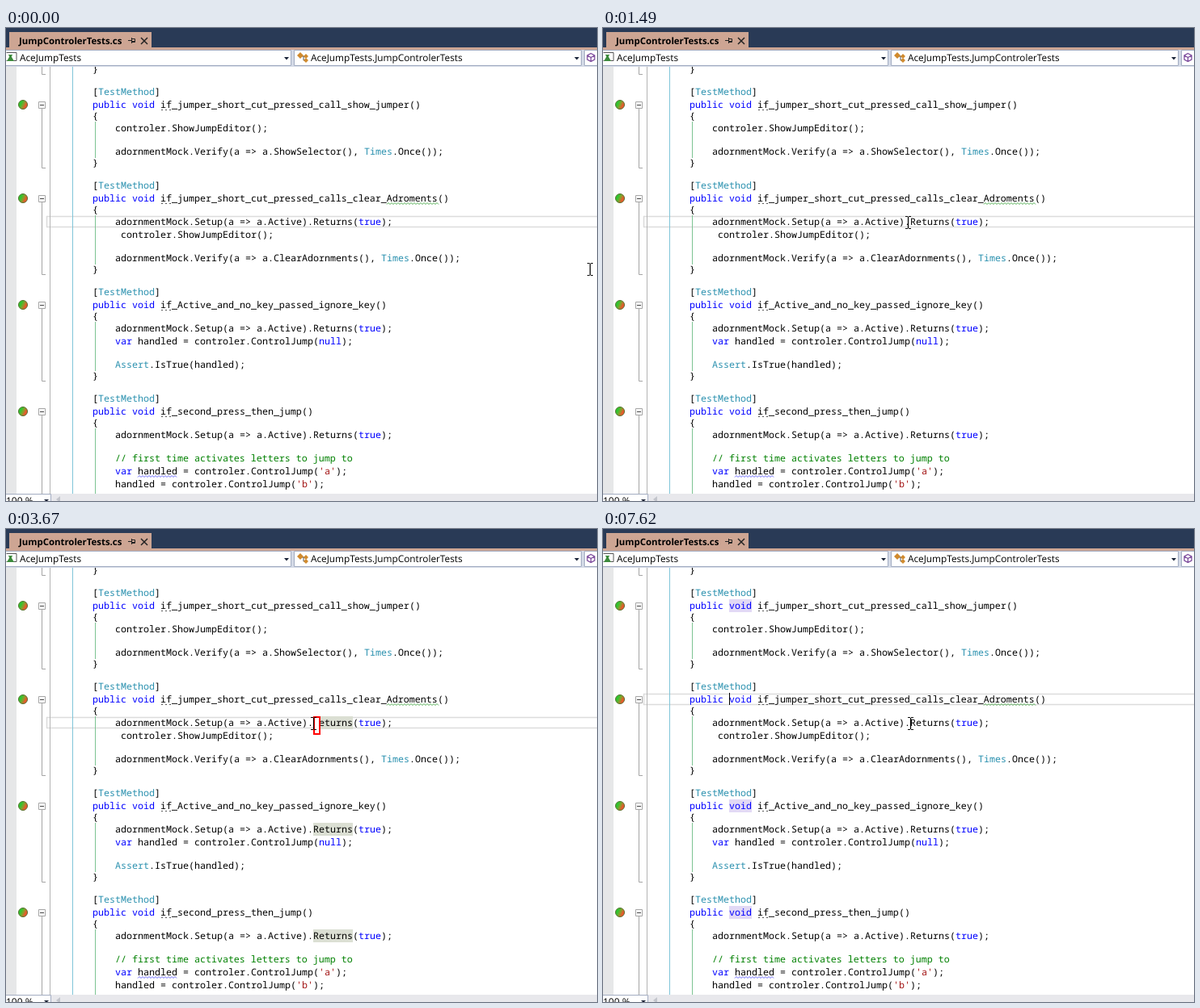
These frames come from a looping animation (731 by 586 pixels, 8000 ms). An HTML page:

```html
<!DOCTYPE html>
<html lang="en">
<head>
<meta charset="utf-8">
<title>Jump to letter in a code editor</title>
<style>
html, body { margin: 0; width: 100%; height: 100%; overflow: hidden; background: #fff; }
svg { display: block; width: 731px; height: 586px; }
text { white-space: pre; text-rendering: geometricPrecision; }
.code { font: 11.667px "Noto Sans Mono", "DejaVu Sans Mono", monospace; }
.ui { font: 12px "Open Sans", "Noto Sans", sans-serif; }
.bold { font-weight: 700; }
.kw { fill: #00f; } .type { fill: #2b91af; } .note { fill: #008000; } .str { fill: #a31515; }

.anim { animation: 8s step-end infinite; }
#mouse { animation-name: mouse; }
#row { animation-name: row; }
#tip { animation-name: tip; }
#refs { animation-name: refs; }
#own { animation-name: own; }
#voids { animation-name: voids; }
#caret { animation-name: caret; }
#caret2 { animation-name: caret2; }
#prompt { animation-name: prompt; }
#labels { animation-name: labels; }
@keyframes mouse {
  0% { transform: translate(722px, 299px); }
  6.625% { transform: translate(721px, 301px); }
  8.5% { transform: translate(509px, 247px); }
  11.625% { transform: translate(508px, 247px); }
  13.375% { transform: translate(364px, 247px); }
  15.25% { transform: translate(362px, 247px); }
  16.75% { transform: translate(374px, 242px); }
  18.625% { transform: translate(377px, 241px); }
  20.5%, 100% { transform: translate(380px, 241px); }
}
@keyframes row { 0% { transform: none; } 88.625%, 100% { transform: translateY(-29px); } }
@keyframes tip { 0% { opacity: 0; } 16.75% { opacity: 1; } 18.625%, 100% { opacity: 0; } }
@keyframes refs {
  0% { opacity: 0; fill: #e2d9f5; }
  23.5% { opacity: 1; fill: #e2d9f5; }
  35.5% { opacity: 1; fill: #dbdfd3; }
  88.625%, 100% { opacity: 0; fill: #dbdfd3; }
}
@keyframes own { 0% { opacity: 0; } 35.5% { opacity: 1; } 88.625%, 100% { opacity: 0; } }
@keyframes voids { 0% { opacity: 0; } 88.625%, 100% { opacity: 1; } }
@keyframes caret {
  0% { opacity: 0; } 22% { opacity: 1; } 28.875% { opacity: 0; }
  35.5% { opacity: 1; } 42.5%, 100% { opacity: 0; }
}
@keyframes caret2 { 0% { opacity: 0; } 95.25%, 100% { opacity: 1; } }
@keyframes prompt { 0% { opacity: 0; } 45.875% { opacity: 1; } 88.625%, 100% { opacity: 0; } }
@keyframes labels { 0% { opacity: 0; } 66.875% { opacity: 1; } 88.625%, 100% { opacity: 0; } }
</style>
</head>
<body>
<svg viewBox="0 0 731 586">
  <defs>
    <linearGradient id="ball" x1="0" y1="0.25" x2="1" y2="0.75">
      <stop offset="0.25" stop-color="#2fc52f"/><stop offset="0.5" stop-color="#7fa32c"/><stop offset="0.8" stop-color="#f0542c"/>
    </linearGradient>
    <clipPath id="page"><path d="M0 48H731V577H0Z"/></clipPath>
  </defs>

  <g clip-path="url(#page)">
    <path fill="#fff" d="M0 47H731V577H0Z"/>
    <path fill="#e6e7e8" d="M0 47H13V577H0Z"/>
    <g id="row" class="anim"><path d="M50.5 233.5H740V246.5H50.5Z" fill="none" stroke="#dcdcdc" stroke-width="1.6"/></g>
    <path d="M54.5 47V577" stroke="#b4b4b4"/>
    <path d="M82.5 47V577" stroke="#7fc4d8"/>
    <g id="refs" class="anim">
      <path d="M380 364h49v16h-49zM380 496h49v16h-49z"/>
      <path id="own" class="anim" d="M380 232h49v16h-49z"/>
    </g>
    <path id="voids" class="anim" fill="#e2d9f5" d="M156 87h28v16h-28zM156 335h28v16h-28zM156 467h28v16h-28z"/>
    <g id="margin"></g>
    <g id="code" class="code"></g>
    <g id="waves" fill="none"></g>
    <path id="caret" class="anim" d="M380 232h1v15h-1z"/>
    <path id="caret2" class="anim" d="M156 203h1v15h-1z"/>
    <g id="labels" class="anim ui bold"></g>
    <path id="prompt" class="anim" d="M381 233h7v21h-7z" fill="#fff" stroke="#f00" stroke-width="2"/>
    <g id="tip" class="anim">
      <path d="M324.5 250.5h188v26h-188z" fill="#f6f6f8" stroke="#b8bccb"/>
      <path d="M331 259h9v9h-9z" fill="#6d6d6d"/>
      <text class="ui" x="346" y="268"><tspan class="kw">bool</tspan> IAdornment.Active</text>
    </g>
  </g>

  <path fill="#293a56" d="M0 0H731V27H0Z"/>
  <path fill="#cda593" d="M4 5H180V24H731V28H0V24H4Z"/>
  <text class="ui bold" x="16" y="20" style="font-size:11.4px">JumpControlerTests.cs</text>
  <path d="M151 15.5h4M155.5 12v7M155.5 13.5h4v4h-4M155.5 16.5h4" fill="none" stroke="#222"/>
  <path d="M167 12l8 8M175 12l-8 8" stroke="#222" stroke-width="1.5"/>

  <path fill="#d3d9e6" d="M0 27H731V48H0Z"/>
  <path d="M-1 27.5H352.5V46.5H-1ZM356.5 27.5H711.5V46.5H356.5ZM715.5 27.5H740V46.5H715.5Z" fill="#fff" stroke="#a3adc2"/>
  <path d="M0.5 30.500H13V40.500H0.500" fill="#fff" stroke="#555"/>
  <path d="M3 33h5v1h-1v2l3 5h-9l3-5v-2h-1z" fill="#3c8a3c"/>
  <path d="M344 36h6l-3 3.500zM703 36h6l-3 3.500z" fill="#1b2438"/>
  <path d="M366 35h4M368 35v5h3" fill="none" stroke="#555"/>
  <path d="M364 30l4 4-4 4-4-4zM371 32l3 3-3 3-3-3zM371 37l3 3-3 3-3-3z" fill="#d08a2e"/>
  <path d="M723.500 31.500l4.500 2.500v5l-4.500 2.500-4.500-2.500v-5zM719 34l4.500 2.500 4.500-2.500M723.500 36.500v5" fill="none" stroke="#7c4a9c" stroke-width="1.300"/>
  <g class="ui" style="font-size:11.8px">
    <text x="17" y="41">AceJumpTests</text>
    <text x="377" y="41">AceJumpTests.JumpControlerTests</text>
  </g>

  <path fill="#e8e8ec" d="M0 577H731V586H0Z"/>
  <path d="M-1 577.500H55.500V590H-1Z" fill="#fff" stroke="#a3adc2"/>
  <text class="ui" x="0" y="590">100 %</text>
  <path d="M47 584h6l-3 3z" fill="#1b2438"/>
  <path d="M67 580v8l-5-4z" fill="#c3c5cc"/>

  <g id="mouse" class="anim">
    <path d="M-3 -7.500H0M1 -7.500H4M0.500 -7V7M-3 7.500H0M1 7.500H4" fill="none" stroke="#000" stroke-width="1.200"/>
  </g>
</svg>
<script>
const COL = 7, LEFT = 107;
// middle of the line, indent in columns, text
const lines = [
  [51, 0, "}"],
  [79, 0, "[TestMethod]"],
  [95, 0, "public void if_jumper_short_cut_pressed_call_show_jumper()"],
  [109, 0, "{"],
  [124, 4, "controler.ShowJumpEditor();"],
  [153, 4, "adornmentMock.Verify(a => a.ShowSelector(), Times.Once());"],
  [167, 0, "}"],
  [195, 0, "[TestMethod]"],
  [211, 0, "public void if_jumper_short_cut_pressed_calls_clear_Adroments()"],
  [225, 0, "{"],
  [240, 4, "adornmentMock.Setup(a => a.Active).Returns(true);"],
  [256, 5, "controler.ShowJumpEditor();"],
  [285, 4, "adornmentMock.Verify(a => a.ClearAdornments(), Times.Once());"],
  [299, 0, "}"],
  [327, 0, "[TestMethod]"],
  [343, 0, "public void if_Active_and_no_key_passed_ignore_key()"],
  [357, 0, "{"],
  [372, 4, "adornmentMock.Setup(a => a.Active).Returns(true);"],
  [388, 4, "var handled = controler.ControlJump(null);"],
  [417, 4, "Assert.IsTrue(handled);"],
  [431, 0, "}"],
  [459, 0, "[TestMethod]"],
  [475, 0, "public void if_second_press_then_jump()"],
  [489, 0, "{"],
  [504, 4, "adornmentMock.Setup(a => a.Active).Returns(true);"],
  [533, 4, "// first time activates letters to jump to"],
  [549, 4, "var handled = controler.ControlJump('a');"],
  [565, 4, "handled = controler.ControlJump('b');"]
];
const kinds = [
  ["note", /^\/\//], ["str", /^'/],
  ["kw", /^(public|void|var|true|null)$/],
  ["type", /^(TestMethod|Times|Assert)$/]
];
const token = /\/\/.*|'.'|\w+|[^\w\s']+/g;
const put = (id, html) => document.getElementById(id).insertAdjacentHTML("beforeend", html);
const esc = s => s.replace(/>/g, "&gt;");

for (const [y, indent, src] of lines) {
  const x = LEFT + indent * COL;
  for (const m of src.matchAll(token)) {
    const kind = kinds.find(k => k[1].test(m[0]));
    put("code", `<text class="${kind ? kind[0] : ""}" x="${x + m.index * COL}" y="${y + 4}">${esc(m[0])}</text>`);
  }
  if (src.startsWith("public")) method(y);
}

// margin marks and brace guide of the method whose header is at y
function method(y) {
  const end = lines.find(l => l[0] > y && l[2] === "}");
  const stop = end ? end[0] : 600;
  put("margin", `
    <circle cx="21" cy="${y}" r="5.500" fill="url(#ball)" stroke="#55702c"/>
    <path d="M44.500 ${y + 5}V${stop + 6.5}H49" fill="none" stroke="#a5a5a5"/>
    <path d="M40.500 ${y - 3.5}h8v8h-8z" fill="#fff" stroke="#a5a5a5"/>
    <path d="M42 ${y + 0.5}h5" stroke="#444"/>
    <path d="M110.500 ${y + 21}V${stop - 6}" stroke="#7cc492"/>
    <path d="M192 ${y + 6.5}h12" stroke="#555" stroke-dasharray="2 3"/>`);
}
put("margin", '<path d="M44.500 47V57.500H49" fill="none" stroke="#a5a5a5"/>');

function wave(x, y, width, color) {
  const zig = "l2 -2l2 2".repeat(width / 4);
  put("waves", `<path d="M${x} ${y}${zig}" stroke="${color}" stroke-width="0.900"/>`);
}
wave(471, 218.5, 64, "#3fa53f");
wave(163, 556.5, 48, "#5a5aff");

// every letter v in view gets the next letter of the alphabet
let next = 65;
for (const [y, indent, src] of lines) {
  for (const m of src.matchAll(/v/gi)) {
    const x = LEFT + (indent + m.index) * COL;
    put("labels", `<path d="M${x} ${y - 8}h11v16h-11z" fill="#adff2f"/>
      <text x="${x + 0.5}" y="${y + 4}">${String.fromCharCode(next++)}</text>`);
  }
}
</script>
</body>
</html>
```
